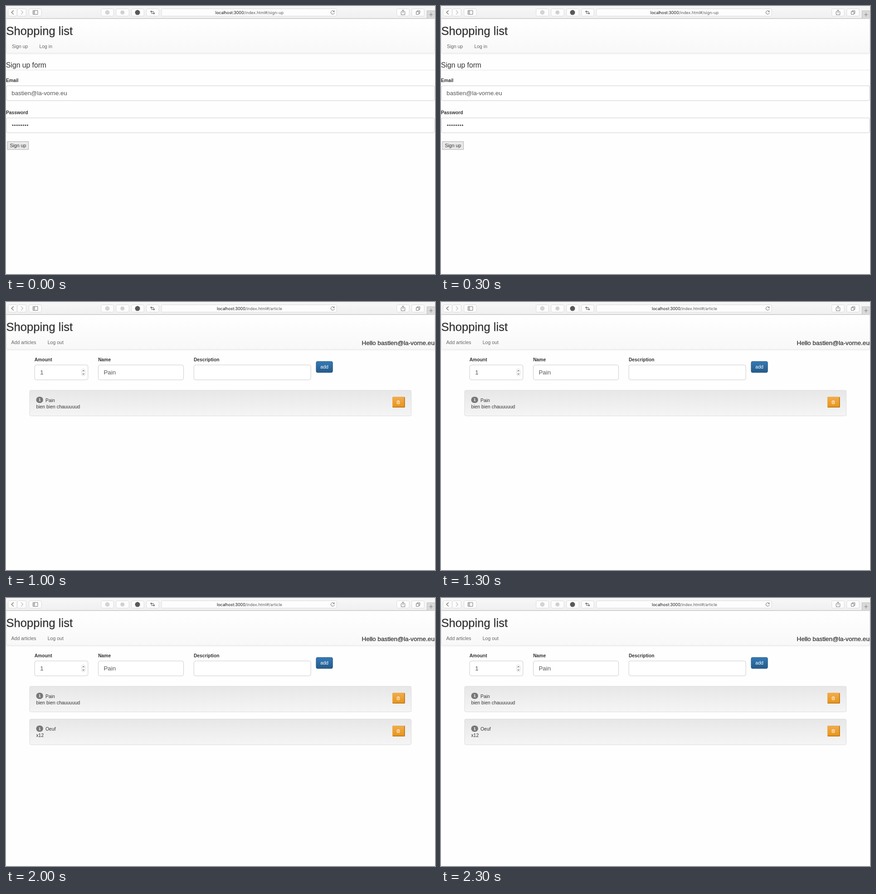
An HTML page for the animation above (2500 ms loop, 946 by 592 pixels).

```html
<!DOCTYPE html>
<html lang="en">
<head>
<meta charset="utf-8">
<title>Shopping list</title>
<style>
html, body { margin: 0; width: 100%; height: 100%; overflow: hidden; background: #fefefe; }
svg { display: block; width: 946px; height: 592px; font: 10.45px "Liberation Sans", Arial, sans-serif; fill: #333; }

.guest, .form, .done, .app, .blank, .typed, .second {
  visibility: hidden;
  animation: 2.5s step-end infinite;
}
.guest  { animation-name: guest; }
.form   { animation-name: form; }
.done   { animation-name: done; }
.app    { animation-name: app; }
.blank  { animation-name: blank; }
.typed  { animation-name: typed; }
.second { animation-name: second; }
@keyframes guest  { 0% { visibility: visible } 40%, 100% { visibility: hidden } }
@keyframes form   { 0% { visibility: visible } 20%, 100% { visibility: hidden } }
@keyframes done   { 0% { visibility: hidden } 20% { visibility: visible } 40%, 100% { visibility: hidden } }
@keyframes app    { 0% { visibility: hidden } 40%, 100% { visibility: visible } }
@keyframes blank  { 0% { visibility: hidden } 40% { visibility: visible } 60% { visibility: hidden } 80%, 100% { visibility: visible } }
@keyframes typed  { 0% { visibility: hidden } 60% { visibility: visible } 80%, 100% { visibility: hidden } }
@keyframes second { 0% { visibility: hidden } 80%, 100% { visibility: visible } }

.url { font: 8.9px Inter, Roboto, sans-serif; fill: #5c5c5c; text-anchor: middle; }
.url tspan { fill: #111; }
.key { fill: #fdfdfd; stroke: #e4e4e4; stroke-width: .8; filter: drop-shadow(0 .7px .3px #0003); }
.icon { fill: none; stroke: #666; }
.nav { fill: #666; }
.medium { stroke: #333; stroke-width: .3px; }
.label { font-weight: bold; font-size: 10.3px; }
.field { fill: #fff; stroke: #ccc; }
.value { font-size: 13.25px; fill: #555; }
.focus { stroke: #66afe9; filter: drop-shadow(0 0 2.5px #66afe9b0); }
.bar { fill: url(#bar); stroke: #e7e7e7; filter: drop-shadow(0 1px 1.5px #0001); }
</style>
</head>
<body>
<svg viewBox="0 0 946 592">
  <defs>
    <linearGradient id="chrome" x2="0" y2="1"><stop stop-color="#f7f7f7"/><stop offset="1" stop-color="#f0f0f0"/></linearGradient>
    <linearGradient id="bar" x2="0" y2="1"><stop stop-color="#fff"/><stop offset="1" stop-color="#f8f8f8"/></linearGradient>
    <linearGradient id="blue" x2="0" y2="1"><stop stop-color="#337ab7"/><stop offset="1" stop-color="#265a88"/></linearGradient>
    <linearGradient id="well" x2="0" y2="1"><stop stop-color="#e7e7e7"/><stop offset="1" stop-color="#f5f5f5"/></linearGradient>
    <linearGradient id="amber" x2="0" y2="1"><stop stop-color="#f0ad4e"/><stop offset="1" stop-color="#eb9316"/></linearGradient>
    <g id="row">
      <rect x="52" y="195" width="841.6" height="56.6" rx="3" fill="url(#well)" stroke="#dcdcdc"/>
      <rect x="66.5" y="209.3" width="15.4" height="13.6" rx="6.8" fill="#777"/>
      <text x="74.2" y="219.4" font-size="9" font-weight="bold" fill="#fff" text-anchor="middle">1</text>
      <rect x="852" y="209.5" width="27.5" height="23.5" rx="2" fill="url(#amber)"/>
      <path d="M852.7 232V210.2H878.5" fill="none" stroke="#eda83f"/>
      <path d="M852.5 232.4H878.8V210" fill="none" stroke="#a8690f" stroke-width="1.3"/>
      <path d="M861.5 219.3H868.5M863.7 219V217.9H866.3V219M862.3 219.5V225H867.7V219.5M864.1 220.8V223.8M865.9 220.8V223.8" fill="none" stroke="#fff" stroke-width=".8"/>
    </g>
  </defs>

  <!-- Browser toolbar -->
  <rect width="946" height="27.5" fill="url(#chrome)"/>
  <path d="M0 27.5H946" stroke="#c6c6c6"/>
  <g id="keys"></g>
  <g class="icon">
    <path d="M16.7 9.8 12.2 14.2 16.7 18.6" stroke-width="1.2"/>
    <path d="M33 9.8 37.5 14.2 33 18.6" stroke="#bbb" stroke-width="1.2"/>
    <path d="M59.5 10H70V18.5H59.5ZM63 10V18.5M60.5 12H62M60.5 14H62M60.5 16H62" stroke-width=".9"/>
    <path d="M319 12.3H326M321 10.3 319 12.3 321 14.3M320 16.2H327.5M325.5 14.2 327.5 16.2 325.5 18.2" stroke-width="1.3"/>
    <path d="M723.6 12.2A3.9 3.9 0 1 0 724.2 14.7M724 9.8V12.6H721.2"/>
    <path d="M873.7 12.4H871.3V19.3H879.7V12.4H877.3M875.5 16V8.8M873.3 10.8 875.5 8.6 877.7 10.8" stroke-width=".9"/>
    <path d="M904.5 12.5H910.5V18.5H904.5ZM906.7 12.3V10.3H912.7V16.3H910.7" stroke-width=".9"/>
  </g>
  <circle cx="223.5" cy="14.3" r="5" fill="#d4d4d4"/>
  <circle cx="256.8" cy="14.3" r="4.5" fill="#d0d0d0"/>
  <circle cx="290" cy="14.3" r="5.5" fill="#585858"/>
  <path d="M928.5 27.5V10.5H946" fill="none" stroke="#bdbdbd"/>
  <rect x="929" y="11" width="17" height="16.5" fill="#d9d9d9"/>
  <path d="M933 19H941.5M937.25 14.8V23.2" stroke="#777" stroke-width=".9"/>

  <!-- Navigation -->
  <g class="guest">
    <rect class="bar" x=".5" y="28.5" width="945" height="75.7" rx="3"/>
    <g class="nav"><text x="13" y="93.2">Sign up</text><text x="73.5" y="93.2">Log in</text></g>
  </g>
  <g class="app">
    <rect class="bar" x=".5" y="28.5" width="945" height="76.3" rx="3"/>
    <g class="nav" font-size="10.55"><text x="11.5" y="93.2">Add articles</text><text x="91.7" y="93.2">Log out</text></g>
    <text class="medium" x="945" y="94.8" font-size="13.6" text-anchor="end">Hello bastien@la-vorne.eu</text>
  </g>
  <text class="medium" x=".5" y="64" font-size="25.6">Shopping list</text>

  <!-- Sign-up form -->
  <g class="form">
    <text class="url" x="537" y="17.8"><tspan>localhost:3000</tspan>/index.html#/sign-up</text>
    <text x="0" y="136.3" font-size="15.7">Sign up form</text>
    <path d="M0 141.5H946" stroke="#e5e5e5"/>
    <text class="label" x="0" y="168">Email</text>
    <rect class="field" x=".5" y="176.2" width="945" height="32.8" rx="4"/>
    <text class="value" x="12.3" y="197">bastien@la-vorne.eu</text>
    <text class="label" x="0" y="239.2">Password</text>
    <rect class="field" x=".5" y="247.2" width="945" height="32.8" rx="4"/>
    <path d="M15 263.4H48" fill="none" stroke="#555" stroke-width="3.4" stroke-linecap="round" stroke-dasharray="0 4.63"/>
    <rect x="3" y="299.5" width="46.7" height="17.5" fill="#e9e9e9" stroke="#adadad"/>
    <text x="8.4" y="312" font-size="10.6">Sign up</text>
  </g>

  <!-- Confirmation -->
  <g class="done">
    <text class="url" x="537" y="17.8"><tspan>localhost:3000</tspan>/index.html#/sign-up/success</text>
    <text class="medium" x="0" y="143.6" font-size="27.2">You are now registered.</text>
    <text x="0" y="166.6">Please <tspan fill="#2a70b8">log in</tspan> to perform more actions.</text>
  </g>

  <!-- Articles -->
  <g class="app">
    <text class="url" x="537" y="17.8"><tspan>localhost:3000</tspan>/index.html#/article</text>
    <g class="label"><text x="62.7" y="131">Amount</text><text x="203.2" y="131">Name</text><text x="413.9" y="131">Description</text></g>
    <rect class="field" x="63.2" y="139" width="117.6" height="33" rx="4"/>
    <rect class="field" x="203.6" y="139" width="188" height="33" rx="4"/>
    <rect class="field" x="414.2" y="139" width="258" height="33" rx="4"/>
    <text class="value" x="75.3" y="160">1</text>
    <rect x="166.7" y="147.7" width="8" height="15.4" rx="3.8" fill="#fff" stroke="#ccc" stroke-width=".8"/>
    <path class="icon" d="M168.8 153 170.7 151 172.6 153M168.8 158 170.7 160 172.6 158" stroke="#444" stroke-width="1.1"/>
    <rect x="684" y="131.3" width="36.2" height="24.5" rx="3" fill="url(#blue)" stroke="#245580"/>
    <text x="702.1" y="147.4" font-size="10.6" fill="#fff" text-anchor="middle" style="fill:#fff">add</text>
    <use href="#row"/>
    <text x="87" y="220.5">Pain</text>
    <text x="66.4" y="234.8">bien bien chauuuuud</text>
  </g>
  <text class="blank value" x="215.5" y="160">Pain</text>
  <g class="typed">
    <rect class="field focus" x="203.6" y="139" width="188" height="33" rx="4"/>
    <g class="value"><text x="215.5" y="160">Oeuf</text><text x="426" y="160">x12</text></g>
  </g>
  <g class="second" transform="translate(0 72.5)">
    <use href="#row"/>
    <text x="87" y="220.5">Oeuf</text>
    <text x="66.4" y="234.8">x12</text>
  </g>
</svg>
<script>
const keys = [[5, 19], [25, 19], [51, 27], [210, 27], [243, 28], [277, 27], [310, 27], [343, 386], [862, 27], [895, 27]];
document.getElementById("keys").innerHTML = keys
  .map(([x, w]) => `<rect class="key" x="${x}" y="6.2" width="${w}" height="15.8" rx="2.5"/>`)
  .join("");
</script>
</body>
</html>
```
